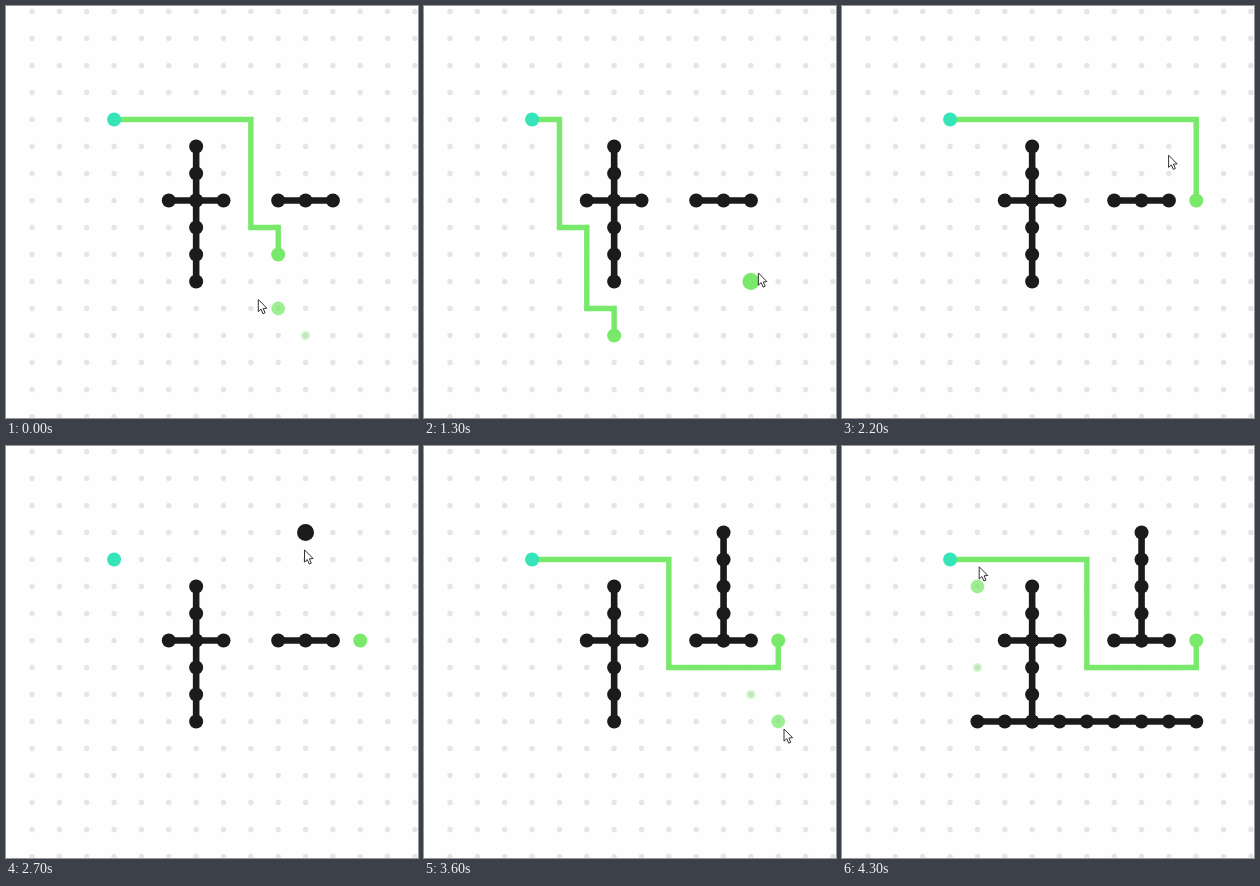
Write an HTML page with a canvas that moves like this. It is 412 by 412 pixels and loops after 4.4 s.

```html
<!DOCTYPE html>
<html lang="en">
<head>
<meta charset="utf-8">
<title>Grid path finder</title>
<style>
  html, body { margin: 0; width: 100%; height: 100%; overflow: hidden; background: #fefefe; }
  canvas { display: block; width: 100vw; height: 100vh; }
</style>
</head>
<body>
<canvas id="stage"></canvas>
<script>
const SIZE = 412, LOOP = 4400, STEP = 100;
const GREEN = '#78e96b', TEAL = '#35e5b7', WALL = '#1b1b1d', DOT = '#e5e5e5';
const NODE_R = 7, DOT_R = 2.7, HOVER_R = 8.5;
const LAG = 100, HIT_R = 10; // nodes react late, and only to a close pointer

const canvas = document.getElementById('stage');
const ctx = canvas.getContext('2d');
const scale = window.devicePixelRatio || 1;
canvas.width = canvas.height = SIZE * scale;
ctx.scale(scale, scale);

const PITCH_X = 27.35, PITCH_Y = 27, LEFT = -1.3, TOP = 5.5;
const gx = col => LEFT + PITCH_X * col;
const gy = row => TOP + PITCH_Y * row;
const nearestNode = ([x, y]) => [Math.round((x - LEFT) / PITCH_X), Math.round((y - TOP) / PITCH_Y)];
const clamp = (v, lo, hi) => Math.min(hi, Math.max(lo, v));
const smooth = k => k * k * (3 - 2 * k);

const START = [4, 4];
const routes = [
  { from: 0, points: [START, [9, 4], [9, 8], [10, 8], [10, 9]] },
  { from: 800, points: [START, [5, 4], [5, 8], [6, 8], [6, 11], [7, 11], [7, 12]] },
  { from: 1700, points: [START, [13, 4], [13, 7]] },
  { from: 3100, points: [START, [9, 4], [9, 8], [13, 8], [13, 7]] }
];

// Walls run from a node in one direction; those with times are dragged out by the pointer.
const walls = [
  { at: [7, 5], dir: [0, 1], count: 6 },
  { at: [6, 7], dir: [1, 0], count: 3 },
  { at: [10, 7], dir: [1, 0], count: 3 },
  { at: [11, 3], dir: [0, 1], count: 5, from: 2500, until: 3100 },
  { at: [13, 10], dir: [-1, 0], count: 9, from: 3700, until: 4100 }
];

// Pointer stops; it eases from one to the next.
const stops = [
  { arrive: -300, leave: -200, x: 298, y: 326 },
  { arrive: 0, leave: 0, x: 252.3, y: 293.5 },
  { arrive: 200, leave: 200, x: 238, y: 281 },
  { arrive: 400, leave: 800, x: 188.8, y: 332 },
  { arrive: 950, leave: 950, x: 275, y: 331 },
  { arrive: 1100, leave: 1200, x: 332, y: 274 },
  { arrive: 1700, leave: 2000, x: 354.7, y: 206.4 },
  { arrive: 2400, leave: 2600, x: 298.5, y: 92 },
  { arrive: 3100, leave: 3200, x: 298.6, y: 206 },
  { arrive: 3550, leave: 3700, x: 360, y: 283 },
  { arrive: 4000, leave: 4000, x: 137, y: 276 },
  { arrive: 4250, leave: LOOP, x: 137.2, y: 120.8 }
];

function pointerAt(t) {
  const i = Math.max(0, stops.findIndex(s => t <= s.leave));
  const b = stops[i], a = stops[i - 1] || b;
  if (t >= b.arrive || a === b) return [b.x, b.y];
  const k = smooth((t - a.leave) / (b.arrive - a.leave));
  return [a.x + (b.x - a.x) * k, a.y + (b.y - a.y) * k];
}

function hoveredNode(t) {
  const [x, y] = pointerAt(t - LAG);
  const [c, r] = nearestNode([x, y]);
  return Math.hypot(x - gx(c), y - gy(r)) <= HIT_R ? [c, r] : null;
}

function wallNodes({ at, dir, count, from, until }, t) {
  let last = count - 1;
  if (from !== undefined) {
    if (t < from) return [];
    const [c, r] = nearestNode(pointerAt(Math.min(t, until) - LAG));
    last = clamp((c - at[0]) * dir[0] + (r - at[1]) * dir[1], 0, last);
  }
  return Array.from({ length: last + 1 }, (_, i) => [at[0] + i * dir[0], at[1] + i * dir[1]]);
}

function disc([col, row], r, color, alpha = 1) {
  ctx.globalAlpha = alpha;
  ctx.fillStyle = color;
  ctx.beginPath();
  ctx.arc(gx(col), gy(row), r, 0, Math.PI * 2);
  ctx.fill();
  ctx.globalAlpha = 1;
}

function line(points, width, color) {
  ctx.strokeStyle = color;
  ctx.lineWidth = width;
  ctx.lineJoin = 'miter';
  ctx.beginPath();
  points.forEach(([c, r]) => ctx.lineTo(gx(c), gy(r)));
  ctx.stroke();
}

// The hovered node swells; the ones just left shrink and fade.
function drawHover(t, blocked) {
  const seen = new Set();
  for (let age = 0; age < 3; age++) {
    const node = hoveredNode(t - age * STEP);
    if (!node || seen.has(String(node))) continue;
    seen.add(String(node));
    const entering = String(hoveredNode(t - STEP)) !== String(node);
    const level = age ? 0.33 / (age * age) : entering ? 0.72 : 1;
    disc(node, DOT_R + (HOVER_R - DOT_R) * level, blocked.has(String(node)) ? WALL : GREEN, level);
  }
}

function drawPointer([x, y]) {
  const outline = [[0, 0], [0, 12.2], [2.8, 9.7], [4.7, 14.2], [6.8, 13.3], [4.9, 9], [8.6, 8.7]];
  ctx.beginPath();
  outline.forEach(([dx, dy]) => ctx.lineTo(x + dx, y + dy));
  ctx.closePath();
  ctx.fillStyle = '#fff';
  ctx.fill();
  ctx.strokeStyle = '#333';
  ctx.lineWidth = 1;
  ctx.lineJoin = 'round';
  ctx.stroke();
}

function draw(t) {
  ctx.fillStyle = '#fefefe';
  ctx.fillRect(0, 0, SIZE, SIZE);
  for (let c = 1; c <= 15; c++)
    for (let r = 0; r <= 15; r++) disc([c, r], DOT_R, DOT);

  // The route is cleared while a wall is being dragged.
  const { points } = routes.filter(route => route.from <= t).pop();
  const dragging = walls.some(w => t >= w.from && t < w.until);
  if (!dragging) line(points, 5.4, GREEN);

  const blocked = new Set();
  for (const wall of walls) {
    const nodes = wallNodes(wall, t);
    line(nodes, 6.6, WALL);
    for (const node of nodes) {
      disc(node, NODE_R, WALL);
      blocked.add(String(node));
    }
  }
  disc(START, NODE_R, TEAL);
  disc(points[points.length - 1], NODE_R, GREEN);
  drawHover(t, blocked);
  drawPointer(pointerAt(t));
}

const origin = performance.now();
function tick() {
  const t = (performance.now() - origin) % LOOP;
  draw(Math.floor(t / STEP) * STEP);
  requestAnimationFrame(tick);
}
tick();
</script>
</body>
</html>
```
